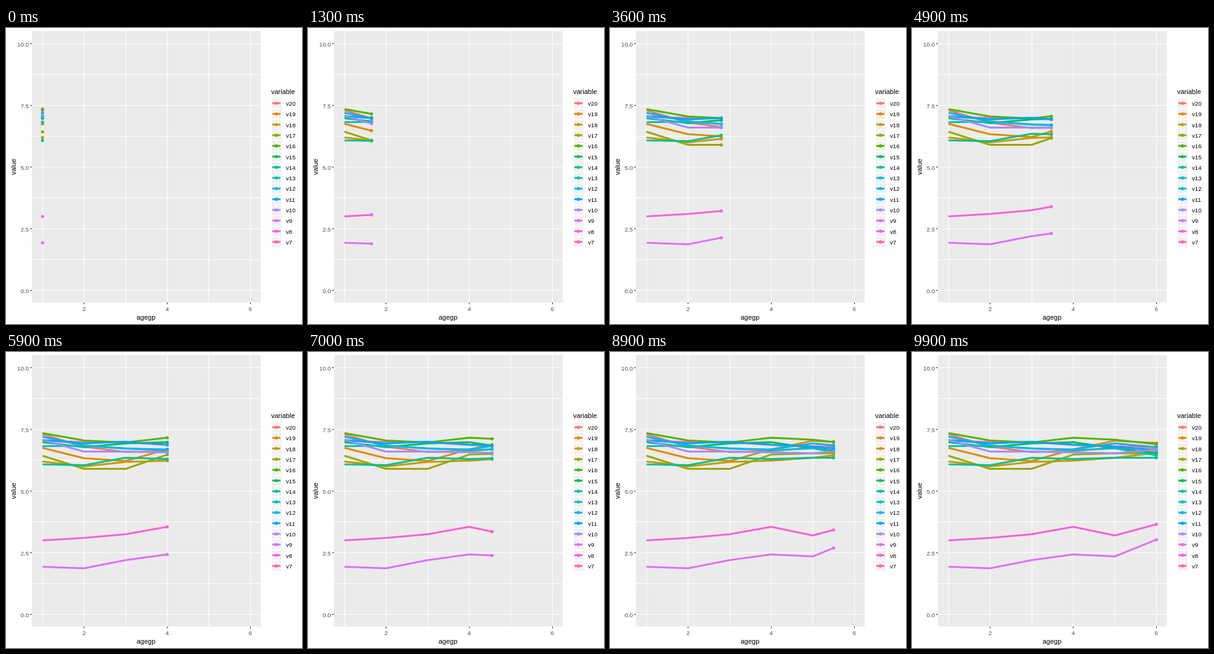
Animation, 480 px wide and 480 px high, one loop 10000 ms. Source, as an HTML page with a canvas:

```html
<!DOCTYPE html>
<html lang="en">
<head>
<meta charset="utf-8">
<title>value by agegp</title>
<style>
html, body { margin: 0; width: 100%; height: 100%; overflow: hidden; background: #fff; }
canvas { display: block; }
</style>
</head>
<body>
<canvas id="chart" width="480" height="480"></canvas>
<script>
const ctx = document.getElementById('chart').getContext('2d');

// Values at agegp 1 to 6
const series = [
  ['v20', '#F8766D', [7.3, 6.8, 6.58, 6.62, 6.77, 6.7]],
  ['v19', '#E38900', [6.75, 6.33, 6.22, 6.69, 7.04, 6.95]],
  ['v18', '#C49A00', [6.2, 6, 6.18, 6.23, 6.35, 6.55]],
  ['v17', '#99A800', [6.43, 5.9, 5.9, 6.48, 6.53, 6.53]],
  ['v16', '#53B400', [7.35, 7.05, 6.97, 7.16, 7.08, 6.9]],
  ['v15', '#00BC56', [6.98, 6.78, 6.93, 6.98, 6.73, 6.55]],
  ['v14', '#00C094', [6.08, 6.05, 6.35, 6.3, 6.35, 6.35]],
  ['v13', '#00BFC4', [6.82, 6.84, 6.73, 6.65, 6.73, 6.45]],
  ['v12', '#00B6EB', [7.2, 6.85, 6.72, 6.69, 6.93, 6.78]],
  ['v11', '#06A4FF', [7.07, 6.93, 7, 6.88, 6.8, 6.65]],
  ['v10', '#A58AFF', [7.07, 6.6, 6.6, 6.57, 6.53, 6.68]],
  ['v9', '#DF70F8', [1.93, 1.87, 2.2, 2.43, 2.35, 3.03]],
  ['v8', '#FB61D7', [3, 3.1, 3.25, 3.55, 3.2, 3.65]],
  ['v7', '#FF66A8', [7.04, 6.99, 6.98, 6.87, 6.82, 6.78]]
];
const drawOrder = [series[13], ...series.slice(0, 13)];
const keySteps = [0, 20, 40, 59, 79, 99];

const px = age => 59.2 + (age - 1) * 67.4;
const py = value => 425.5 - value * 40;

function rect(x, y, w, h, color) {
  ctx.fillStyle = color;
  ctx.fillRect(x, y, w, h);
}

function text(str, x, y, size, color = '#000', align = 'left') {
  ctx.font = `${size}px "Liberation Sans", Arial, sans-serif`;
  ctx.textAlign = align;
  ctx.fillStyle = color;
  ctx.fillText(str, x, y);
}

function dot(x, y, color) {
  ctx.fillStyle = color;
  ctx.beginPath();
  ctx.arc(x, y, 2.6, 0, 7);
  ctx.fill();
}

function line(points, color) {
  ctx.strokeStyle = color;
  ctx.lineWidth = 3;
  ctx.lineJoin = 'round';
  ctx.beginPath();
  points.forEach(p => ctx.lineTo(...p));
  ctx.stroke();
}

function drawPanel() {
  rect(0, 0, 480, 480, '#fff');
  rect(42, 5, 371, 440, '#EBEBEB');
  for (let v = 0; v <= 10; v += 1.25) rect(42, Math.floor(py(v)), 371, 1, '#fff');
  for (let a = 1; a <= 6; a++) rect(Math.floor(px(a)), 5, 1, 440, '#fff');
  for (let v = 0; v <= 10; v += 2.5) {
    rect(39, Math.floor(py(v)), 3, 1, '#333');
    text(v.toFixed(1), 37, py(v) + 4, 9.6, '#4D4D4D', 'right');
  }
  for (let a = 2; a <= 6; a += 2) {
    rect(Math.floor(px(a)), 445, 1, 3, '#333');
    text(a, px(a), 459, 9.6, '#4D4D4D', 'center');
  }
  text('agegp', 227, 473, 11, '#000', 'center');
  ctx.save();
  ctx.translate(16, 225);
  ctx.rotate(-Math.PI / 2);
  text('value', 0, 0, 11, '#000', 'center');
  ctx.restore();
}

function drawLegend() {
  text('variable', 430, 107, 11);
  series.forEach(([name, color], i) => {
    const y = 122 + i * 17.3;
    rect(431, Math.round(y - 8), 16, 16, '#F2F2F2');
    line([[432, y], [445, y]], color);
    dot(438.5, y, color);
    text(name, 454, Math.round(y + 4), 9.6);
  });
}

function drawSeries(step) {
  let seg = 0;
  while (seg < 4 && step >= keySteps[seg + 1]) seg++;
  const k = (step - keySteps[seg]) / (keySteps[seg + 1] - keySteps[seg]);
  const paths = drawOrder.map(([, color, values]) => {
    const points = values.slice(0, seg + 1).map((v, i) => [px(i + 1), py(v)]);
    const value = values[seg] + (values[seg + 1] - values[seg]) * k;
    points.push([px(seg + 1 + k), py(value)]);
    return [points, color];
  });
  if (step) paths.forEach(([points, color]) => line(points, color));
  paths.forEach(([points, color]) => dot(...points[points.length - 1], color));
}

function render() {
  drawPanel();
  drawLegend();
  drawSeries(Math.floor(performance.now() % 10000 / 100));
  requestAnimationFrame(render);
}
render();
</script>
</body>
</html>
```
